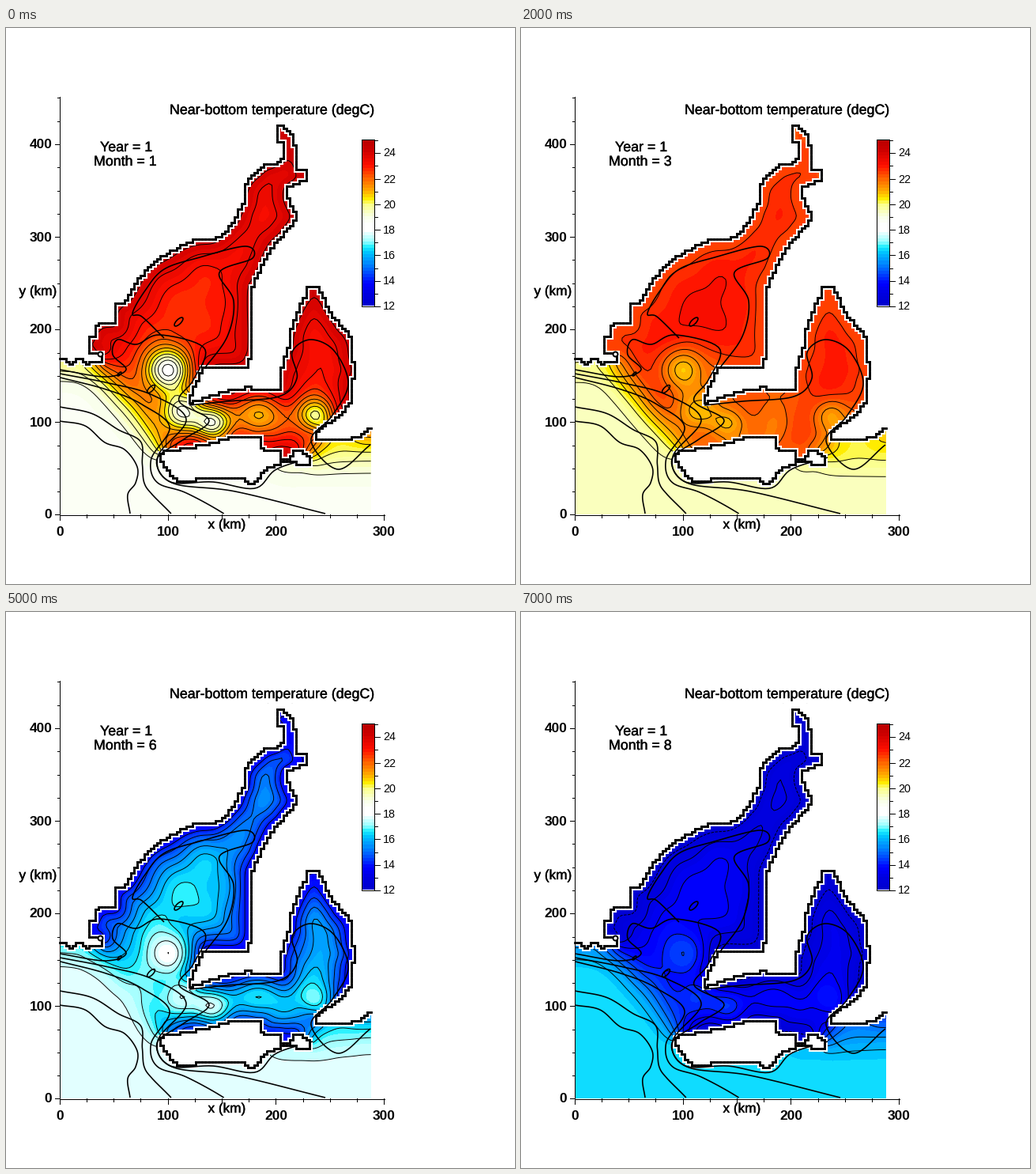
A matplotlib script for the animation above (8 s loop, 644 by 703 pixels).

```python
import numpy as np
import matplotlib.pyplot as plt
from matplotlib.animation import FuncAnimation
from matplotlib.collections import LineCollection
from matplotlib.colors import LinearSegmentedColormap, Normalize
from matplotlib.path import Path
from matplotlib.patheffects import withStroke

W, H, DPI = 644, 703, 100
PX = 72 / DPI
X0, Y0 = 68.5, 614.5             # plot origin in pixels
KX, KY = 410 / 300, 468.5 / 400  # pixels per km

plt.rcParams["font.family"] = "Liberation Sans"
fig = plt.figure(figsize=(W / DPI, H / DPI), dpi=DPI, facecolor="white")
ax = fig.add_axes([0, 0, 1, 1])
ax.axis("off")

# Key points of the coast; the grid turns them into steps
WEST_GULF = [(121, 411), (104, 412), (104, 390), (113, 390), (113, 375), (137, 372),
             (137, 349), (151, 348), (172, 312), (191, 293), (214, 280), (238, 267),
             (272, 265), (288, 245), (303, 215), (304, 192), (325, 174), (347, 170),
             (350, 160), (349, 144), (342, 142), (342, 124), (353, 125), (364, 138),
             (369, 178), (380, 180), (380, 192), (355, 201), (355, 212), (369, 240),
             (335, 278), (312, 326), (311, 378), (308, 418), (304, 430)]
EAST_GULF = [(250, 430), (234, 463), (234, 474), (275, 460), (302, 455), (345, 456),
             (347, 435), (358, 400), (362, 375), (379, 337), (379, 326), (393, 326),
             (415, 366), (436, 390), (440, 430), (437, 470), (425, 487), (391, 512),
             (391, 521), (445, 518), (463, 504), (463, 640), (60, 640)]
ISLAND = [(193, 537), (255, 526), (292, 516), (322, 516), (325, 534), (347, 535),
          (348, 543), (361, 543), (362, 533), (381, 537), (383, 552), (350, 548),
          (327, 558), (313, 578), (300, 570), (270, 570), (215, 572), (196, 548)]

# Yearly cycle of each water type: mean, amplitude, warmest month
OPEN_SEA = (17.8, 1.5, 2.8)
SHALLOWS = (18.0, 6.5, 1.3)
BASIN = (18.7, 4.8, 2.4)
MOUTH = (16.9, 3.7, 3.8)
# Patches of mouth water: x, y, radius, strength
PATCHES = [(205, 432, 26, 1), (222, 485, 24, 0.9), (262, 500, 20, 0.9),
           (320, 492, 30, 0.45), (392, 490, 20, 0.8)]

STOPS = [(12, "#0000cd"), (13, "#0000e1"), (13.7, "#0000ff"), (15.3, "#0087ff"),
         (16.2, "#00c8ff"), (16.6, "#1ef0ff"), (17, "#96ffff"), (17.9, "#ffffff"),
         (18.4, "#ffffff"), (19, "#f8ffe8"), (20, "#fcff82"), (20.4, "#ffee00"),
         (21, "#ffaf00"), (22, "#ff6400"), (23, "#ff0f00"), (24.2, "#cd0000"),
         (25, "#b90000")]
CMAP = LinearSegmentedColormap.from_list("sea", [((t - 12) / 13, c) for t, c in STOPS], N=208)
NORM = Normalize(12, 25)


def picture(data, extent, z, **kw):
    ax.imshow(data, extent=extent, origin="lower", aspect="auto",
              interpolation="nearest", zorder=z, **kw)


def smooth(*pts, n=160):
    """Catmull-Rom curve through the points, as n samples."""
    p = np.array(pts, float)
    p = np.vstack([2 * p[0] - p[1], p, 2 * p[-1] - p[-2]])
    u = np.linspace(0, len(pts) - 1, n)
    k = np.minimum(u.astype(int), len(pts) - 2)
    t = (u - k)[:, None]
    a, b, c, d = (p[k + i] for i in range(4))
    return (b + t * (c - a) / 2 + t**2 * (a - 2.5 * b + 2 * c - d / 2)
            + t**3 * (1.5 * (b - c) + (d - a) / 2))


def line(x, y):
    ax.plot(x, y, color="k", lw=PX, zorder=8, solid_capstyle="butt", antialiased=False)


def label(x, y, s, size=17.8, heavy=True, **kw):
    text = ax.text(x, y, s, fontsize=size * PX, va="baseline", zorder=9, **kw)
    if heavy:
        text.set_path_effects([withStroke(linewidth=0.4 * PX, foreground="k")])
    return text


# Grid and land mask
DX, DY, NX, NY = 4.1, 3.513, 96, 142
xe = 68 + DX * np.arange(NX + 1)
ye = 615 - DY * np.arange(NY + 1)
xs, ys = (xe[1:] + xe[:-1]) / 2, (ye[1:] + ye[:-1]) / 2
gx, gy = np.meshgrid(xs, ys)
cells = np.column_stack([gx.ravel(), gy.ravel()])
cove_x = np.linspace(60, 119, 30)
coves = list(zip(cove_x, 421 + 4 * np.cos(cove_x / 3.3) + 4 * (cove_x > 108)))
mainland = Path(coves + WEST_GULF + EAST_GULF)
water = mainland.contains_points(cells) & ~Path(ISLAND).contains_points(cells)
water = water.reshape(NY, NX)


def neighbours(a):
    p = np.pad(a, 1, mode="edge")
    return np.stack([p[1:-1, 2:], p[1:-1, :-2], p[2:, 1:-1], p[:-2, 1:-1]])


wet = neighbours(water)


def spread(a, steps):
    """Diffuse through water only, so nothing crosses land."""
    for _ in range(steps):
        a = a + 0.2 * np.where(wet, neighbours(a) - a, 0).sum(0)
    return a


def cover_land(a, reach=5):
    """Carry coastal values a few cells inland for clean contours."""
    known = water
    for _ in range(reach):
        near = neighbours(known)
        count = near.sum(0)
        mean = (neighbours(a) * near).sum(0) / np.maximum(count, 1)
        a = np.where(known, a, mean)
        known = known | (count > 0)
    return a


# Share of each water type
shore = ~water & wet.any(0)
dist = np.min(np.hypot(gx[..., None] - gx[shore], gy[..., None] - gy[shore]), axis=-1)
wobble = 1 + 0.15 * np.sin(gx / 11 + 1) * np.sin(gy / 13)
deep = spread(1 - np.exp(-dist * wobble / 35), 4)

outside = ((gy > 425) & (gx < 120 + 0.85 * (gy - 430))) | (gy > 552)
passage = (gx > 385) & (gy > 515)
sea = spread(np.where(outside, 1, 0.7 * passage), 60)

mouth = sum(k * np.exp(-((gx - x)**2 + (gy - y)**2) / r**2) for x, y, r, k in PATCHES)
mouth = spread(np.clip(mouth, 0, 1), 12)

inner = (1 - sea) * (1 - mouth)
SHARES = [(OPEN_SEA, sea), (MOUTH, (1 - sea) * mouth),
          (BASIN, inner * deep), (SHALLOWS, inner * (1 - deep))]
SHARES = [(cycle, cover_land(share)) for cycle, share in SHARES]


def temperature(month):
    return sum(share * (mean + amp * np.cos(np.pi / 6 * (month - peak)))
               for (mean, amp, peak), share in SHARES)


# Land and stepped coast with its white margin
land = np.ones((NY, NX, 4))
land[..., 3] = ~water
picture(land, (xe[0], xe[-1], ye[0], ye[-1]), 5)
edges = [[(xe[i + 1], ye[j]), (xe[i + 1], ye[j + 1])]
         for j, i in np.argwhere(water[:, 1:] != water[:, :-1])]
edges += [[(xe[i], ye[j + 1]), (xe[i + 1], ye[j + 1])]
          for j, i in np.argwhere(water[1:] != water[:-1])]
for color, width, z in (("w", 7, 3), ("k", 2.8, 6)):
    ax.add_collection(LineCollection(edges, colors=color, linewidths=width * PX,
                                     capstyle="projecting", zorder=z))

# Depth contours: the shelf lines lie between an outer and an inner curve
outer = smooth((68, 497), (100, 503), (125, 524), (150, 533), (166, 555), (164, 575),
               (154, 590), (157, 614))
nearshore = smooth((68, 437), (130, 449), (185, 464), (228, 495), (192, 542), (210, 575),
                   (290, 586), (404, 614))
depth_lines = []
for start, end in ((0, 0), (0.3, 0.21), (0.92, 0.48), (1, 1)):
    f = np.linspace(start, end, len(outer))[:, None]
    depth_lines.append((1 - f) * outer + f * nearshore)
depth_lines += [
    smooth((68, 432), (125, 441), (152, 432), (135, 413), (141, 394), (165, 400),
           (195, 388), (251, 405), (237, 445), (219, 472), (257, 496), (225, 520),
           (191, 545), (208, 574), (262, 574), (315, 582), (342, 558), (388, 543)),
    smooth((200, 392), (172, 365), (160, 361), (176, 332), (200, 305), (245, 290),
           (303, 276), (312, 291), (270, 309), (288, 345), (280, 390), (250, 432)),
    smooth((232, 477), (280, 472), (345, 466), (368, 443), (362, 410), (385, 394),
           (415, 408), (433, 450), (412, 491), (386, 522), (420, 558), (461, 527))]
turn = np.linspace(0, 2 * np.pi, 30)
for x, y, r in ((218.5, 371.5, 5.5), (183.5, 456.5, 5), (143.5, 437.5, 2.5)):
    depth_lines.append(np.column_stack([x + r * np.cos(turn),
                                        y - r * np.sin(turn + 0.8)]))
ax.add_collection(LineCollection(depth_lines, colors="k", linewidths=1.6 * PX, zorder=4))
ax.plot(119, 412, "o", ms=6 * PX, mfc="w", mec="k", mew=2 * PX, zorder=7)

# Axes
line([X0, X0], [87, 615])
line([68, 479], [615.5, 615.5])
for km in range(0, 451, 25):
    size = 3 if km % 100 else 6
    x, y = round(68 + km * KX) + 0.5, round(Y0 - km * KY) + 0.5
    line([X0 - size, X0], [y, y])
    if km % 100 == 0:
        label(58.5, y + 6, km, 17.4, False, ha="right", weight="bold")
    if km <= 300:
        line([x, x], [615, 616 + size])
        if km % 100 == 0:
            label(x, 642, km, 17.4, False, ha="center", weight="bold")
label(279.5, 633, "x (km)", 17.2, ha="center")
label(16.5, 338, "y (km)", 17.2)
label(207, 109, "Near-bottom temperature (degC)")
label(119, 156, "Year = 1")
month_text = label(111, 174, "")

# Colour key
picture(np.arange(12.125, 25, 0.25)[:, None], (450, 467, 351, 141), 7, cmap=CMAP, norm=NORM)
line([450.5, 466.5, 466.5, 450.5, 450.5], [140.5, 140.5, 351.5, 351.5, 140.5])
for t in range(12, 26):
    y = round(351 - (t - 12) * 16.15) + 0.5
    line([467, 470 if t % 2 else 473], [y, y])
    if t % 2 == 0:
        label(477, y + 5, t, 14.2, False)

ax.set_xlim(0, W)
ax.set_ylim(H, 0)

FILL = np.arange(12, 25.01, 0.25)
LINES = np.arange(10.5, 25.1, 0.5)
STYLES = ["--" if t < 13 else "-" for t in LINES]
xs[[0, -1]] = xe[[0, -1]]
ys[[0, -1]] = ye[[0, -1]]
drawn = []


def update(i):
    while drawn:
        drawn.pop().remove()
    z = temperature(i + 1)
    drawn.append(ax.contourf(xs, ys, z, FILL, cmap=CMAP, norm=NORM, extend="both",
                             antialiased=False, zorder=1))
    drawn.append(ax.contour(xs, ys, z, LINES, colors="k", linewidths=0.95 * PX,
                            linestyles=STYLES, zorder=2))
    month_text.set_text(f"Month = {i + 1}")
    return [month_text]


anim = FuncAnimation(fig, update, frames=8, interval=1000, init_func=lambda: [],
                     repeat=True, repeat_delay=0)
plt.show()
```
